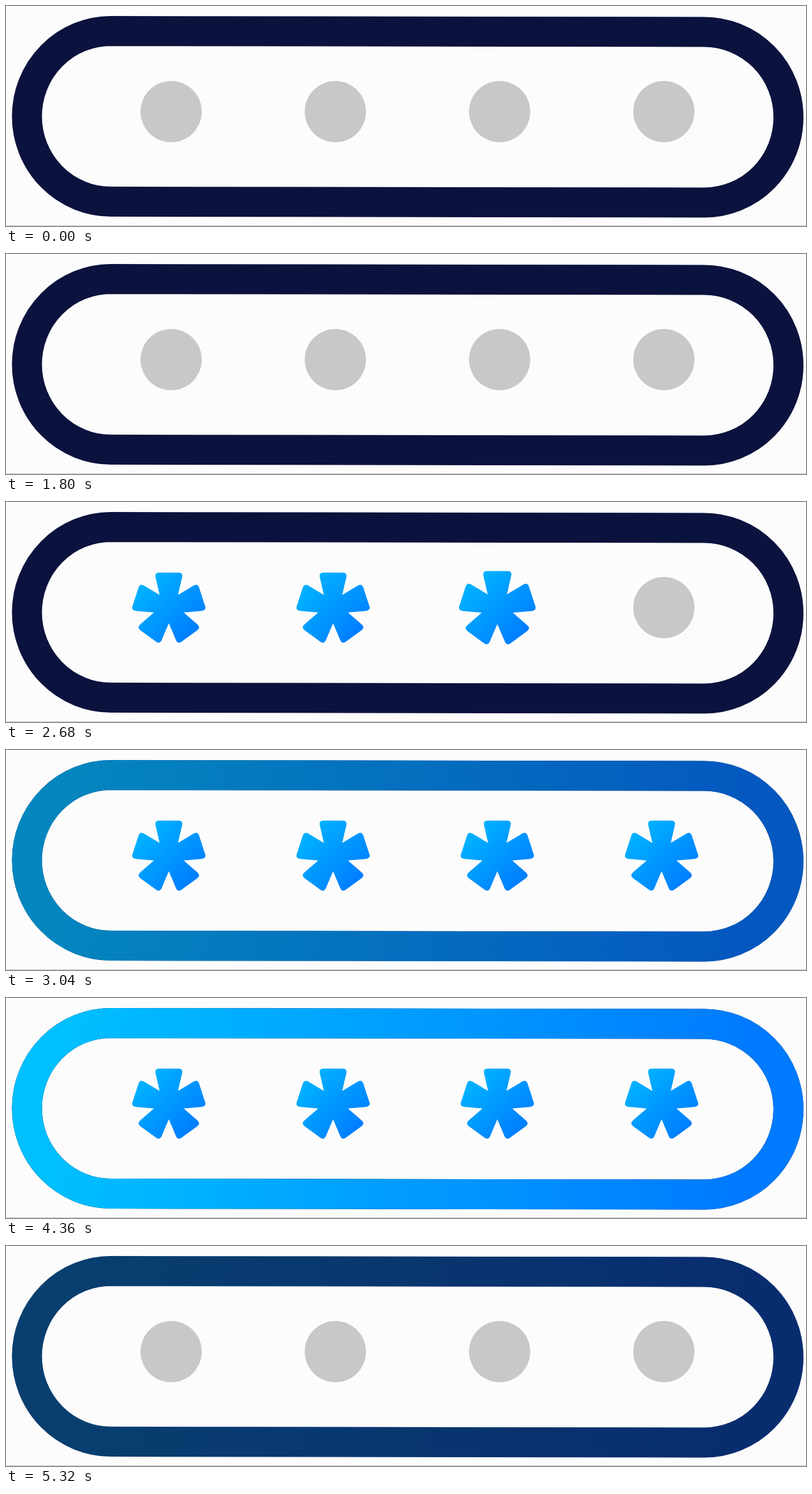
An HTML page for the animation above (5.42 s loop, 1280x352 px).

```html
<!DOCTYPE html>
<html lang="en">
<head>
<meta charset="utf-8">
<title>Passcode field</title>
<style>
  html, body { margin: 0; width: 100%; height: 100%; overflow: hidden; background: #fcfcfc; }
  svg { display: block; width: 100%; height: 100%; }
</style>
</head>
<body>
<svg viewBox="0 0 1280 352">
  <defs>
    <linearGradient id="pillFill" gradientUnits="userSpaceOnUse" x1="90" y1="120" x2="1180" y2="232">
      <stop offset="0" stop-color="#00bfff"/>
      <stop offset="1" stop-color="#007aff"/>
    </linearGradient>
    <linearGradient id="starFill" gradientUnits="userSpaceOnUse" x1="-54" y1="-54" x2="46" y2="46">
      <stop offset="0" stop-color="#00bbff"/>
      <stop offset="1" stop-color="#007aff"/>
    </linearGradient>
    <path id="pill" fill="none" stroke-width="48"
      d="M168 40L1117 41.5A135 136.5 0 0 1 1117 314.5L168 313A134.5 136.5 0 0 1 168 40Z"/>
  </defs>
  <rect width="1280" height="352" fill="#fcfcfc"/>
  <rect y="351" width="1280" height="1" fill="#c8c8c8"/>
  <use href="#pill" stroke="#0b123d"/>
  <use id="glow" href="#pill" stroke="url(#pillFill)"/>
  <g id="slots"></g>
</svg>
<script>
const LOOP = 5420, STEP = 40, LAST = 5320;
const PITCH = 262.8, POP_START = 1840, POP_GAP = 320, POP_TIME = 240, RESET = 5200;

const slots = document.getElementById('slots');
const glow = document.getElementById('glow');

const progress = (t, start, length) => Math.min(1, Math.max(0, (t - start) / length));
const smooth = p => p * p * (3 - 2 * p);
const backOut = p => {
  const q = p - 1;
  return 1 + 3.2 * q ** 3 + 2.2 * q * q;
};

function add(tag, attrs) {
  const el = document.createElementNS('http://www.w3.org/2000/svg', tag);
  for (const key in attrs) el.setAttribute(key, attrs[key]);
  return slots.appendChild(el);
}

// Five rounded petals, each a turned copy of the top one
function starPath() {
  const petal = [[-14.7, -20.2], [-21.2, -48.5], [-22.9, -56], [-15.5, -56],
                 [15.5, -56], [22.9, -56], [21.2, -48.5]];
  let d = '';
  for (let k = 0; k < 5; k++) {
    const a = k * Math.PI * 0.4, c = Math.cos(a), s = Math.sin(a);
    const p = petal.map(([x, y]) => (x * c - y * s).toFixed(2) + ' ' + (x * s + y * c).toFixed(2));
    d += `${k ? 'L' : 'M'}${p[0]}L${p[1]}Q${p[2]} ${p[3]}L${p[4]}Q${p[5]} ${p[6]}`;
  }
  return d + 'Z';
}

const shape = starPath();
const items = [0, 1, 2, 3].map(i => ({
  x: 260.5 + i * PITCH,
  start: POP_START + i * POP_GAP,
  dot: add('circle', { cx: 264.2 + i * PITCH, cy: 169, r: 49, fill: '#c8c8c8' }),
  star: add('path', { d: shape, fill: 'url(#starFill)' })
}));

function draw(time) {
  const t = Math.min(LAST, Math.floor((time % LOOP) / STEP) * STEP);
  const back = progress(t, RESET, 100);

  for (const { x, start, dot, star } of items) {
    const scale = backOut(progress(t, start, POP_TIME)) * (1 - smooth(back));
    star.setAttribute('transform', `translate(${x} 169) scale(${Math.max(0, scale)})`);
    star.style.display = scale > 0.001 ? '' : 'none';
    dot.setAttribute('opacity', Math.max(1 - progress(t, start, 120), back));
  }

  const lit = smooth(progress(t, 2880, 260)) * (1 - smooth(progress(t, 5160, 240)));
  glow.setAttribute('opacity', lit);
}

const origin = performance.now();
function tick() {
  draw(performance.now() - origin);
  requestAnimationFrame(tick);
}
tick();
</script>
</body>
</html>
```
